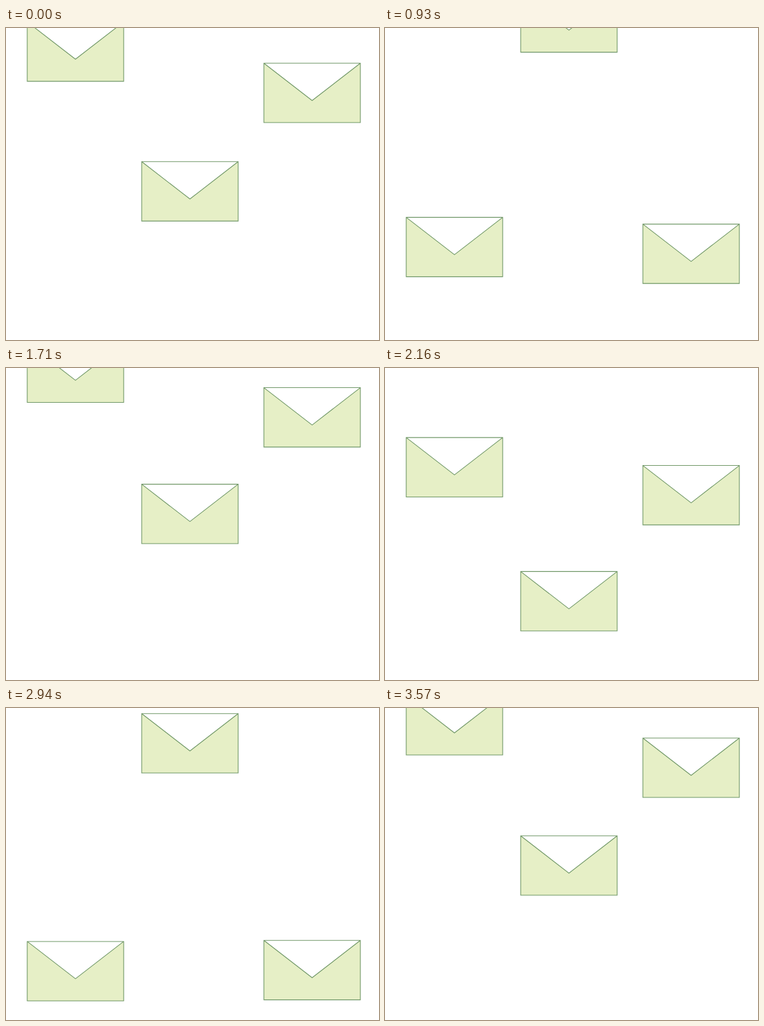
Recreate the animation shown at these times as an HTML page. Size 580x485 px, loop 3.6 s.

```html
<!DOCTYPE html>
<html lang="en">
<head>
<meta charset="utf-8">
<title>Falling envelopes</title>
<style>
  html, body { margin: 0; width: 100%; height: 100%; overflow: hidden; background: #fff; }
  svg { display: block; }
  path { fill: #e6efc6; stroke: #6d9564; stroke-width: 1.1; }
</style>
</head>
<body>
<svg id="stage" width="580" height="485" viewBox="0 0 580 485"></svg>
<script>
const PERIOD = 1800;
const TOP = -94; // just above the stage

// x: left edge, y: top edge at time 0, fall: distance per period
const envelopes = [
  { x: 33, y: -9.8, fall: 588 },
  { x: 211, y: 207.5, fall: 543 },
  { x: 401, y: 54.5, fall: 484 },
];

const stage = document.getElementById('stage');
for (const envelope of envelopes) {
  envelope.node = document.createElementNS(stage.namespaceURI, 'path');
  envelope.node.setAttribute('d', 'M0 0H150V92.3H0ZL75 58L150 0');
  stage.append(envelope.node);
}

function draw(now) {
  const progress = now % PERIOD / PERIOD;
  for (const { x, y, fall, node } of envelopes) {
    const offset = (y - TOP + fall * progress) % fall;
    node.setAttribute('transform', `translate(${x} ${TOP + offset})`);
  }
  requestAnimationFrame(draw);
}
draw(0);
</script>
</body>
</html>
```
